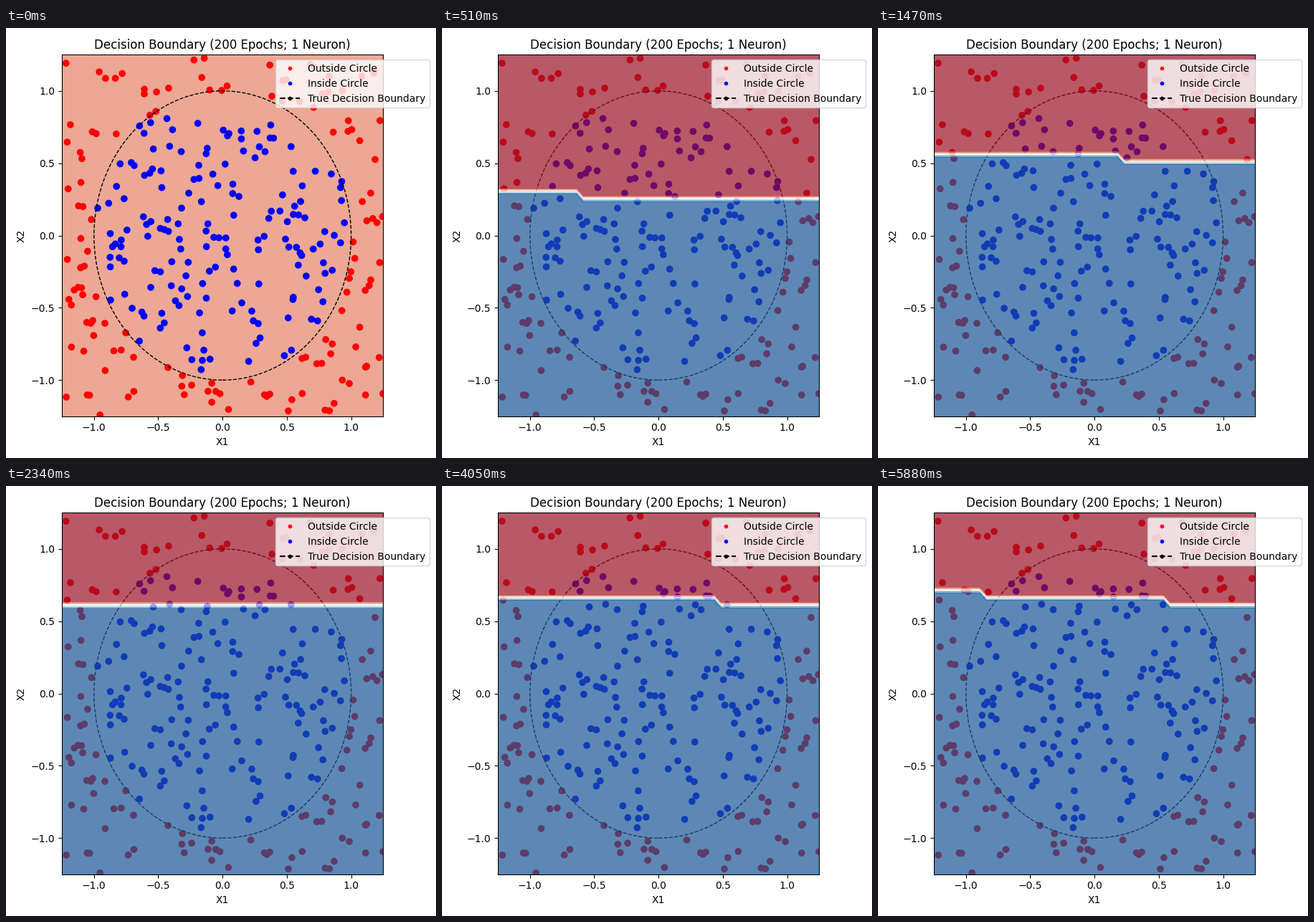
Write a matplotlib script that moves like this. It is 600 px wide and 600 px high and loops after 6030 ms.

```python
import numpy as np
import matplotlib.pyplot as plt
from matplotlib.animation import FuncAnimation
from matplotlib.lines import Line2D

FRAMES = 201
LIMIT = 1.25
CELLS = 49  # grid cells per side

# Boundary height in grid rows at both edges; learning slows down over
# time, so heights are interpolated over the logarithm of the epoch.
EPOCHS = [1, 4, 32, 49, 78, 87, 107, 135, 166, 200]
LEFT = [13, 21.31, 34.24, 35.88, 36.91, 37.004, 37.45, 37.9, 38.0005, 38.28]
RIGHT = [16, 22.29, 32.11, 34.365, 36.005, 36.19, 36.4, 36.568, 36.609, 36.52]

fig, ax = plt.subplots(figsize=(6, 6), dpi=100)
ax.set(xlim=(-LIMIT, LIMIT), ylim=(-LIMIT, LIMIT), xlabel="X1", ylabel="X2",
       xticks=np.linspace(-1, 1, 5), yticks=np.linspace(-1, 1, 5),
       title="Decision Boundary (200 Epochs; 1 Neuron)")

rng = np.random.default_rng(8)
x, y = rng.uniform(-LIMIT, LIMIT, (2, 300))
ax.scatter(x, y, c=np.where(np.hypot(x, y) < 1, "blue", "red"))
ax.add_patch(plt.Circle((0, 0), 1, color="black", fill=False, linestyle="--"))


def legend_entry(label, color, linestyle="none"):
    return Line2D([], [], color=color, marker=".", linestyle=linestyle,
                  label=label)


ax.legend(handles=[legend_entry("Outside Circle", "red"),
                   legend_entry("Inside Circle", "blue"),
                   legend_entry("True Decision Boundary", "black", "--")],
          loc="upper left", bbox_to_anchor=(0.65, 1))
fig.tight_layout()

axis = np.linspace(-LIMIT, LIMIT, CELLS + 1)
index = np.arange(CELLS + 1)
regions = []


def predict(epoch):
    left, right = (np.interp(np.log(epoch), np.log(EPOCHS), edge)
                   for edge in (LEFT, RIGHT))
    height = left + (right - left) * index / CELLS
    return (index[:, None] <= height).astype(float)


def draw(epoch):
    while regions:
        regions.pop().remove()
    if epoch == 0:  # untrained: one flat class behind the samples
        z = np.full((CELLS + 1, CELLS + 1), -0.5)
        levels, zorder = [-1, 0, 1], 0.5
    else:
        z = predict(epoch)
        levels, zorder = np.linspace(0, 1.05, 8), 1.5
    regions.append(ax.contourf(axis, axis, z, levels=levels, cmap="RdBu",
                               alpha=0.7, zorder=zorder))
    return regions


anim = FuncAnimation(fig, draw, frames=FRAMES, interval=30, repeat=True,
                     cache_frame_data=False)
plt.show()
```
